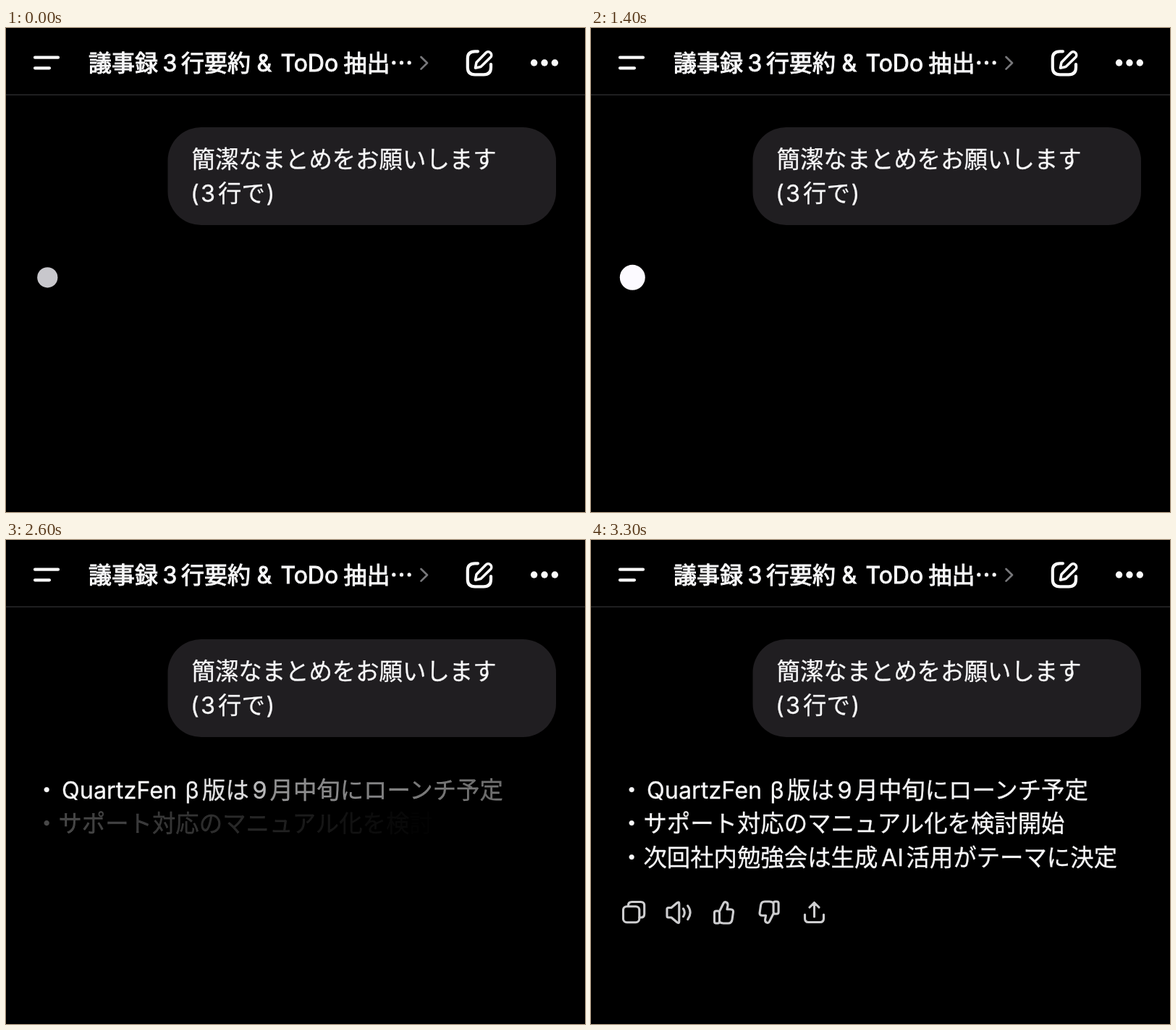
An HTML page that plays this animation: 800 by 668 pixels, repeating every 5.5 s.

```html
<!DOCTYPE html>
<html lang="ja">
<head>
<meta charset="utf-8">
<title>Chat summary</title>
<style>
  html, body { margin: 0; width: 100%; height: 100%; overflow: hidden; background: #000; }
  svg { display: block; width: 100vw; height: 100vh; }
  text { font: 400 32.4px "Noto Sans CJK JP", "Noto Sans CJK", sans-serif; fill: #f8f8f9; stroke: #f8f8f9; stroke-width: .3; white-space: pre; }
  .latin { font-family: Inter, sans-serif; }
  .title { font-size: 32px; stroke-width: 1; }
  .line { fill: none; stroke: #fafafa; stroke-width: 4.2; stroke-linecap: round; stroke-linejoin: round; }
  #actions { stroke: #cdcdcf; stroke-width: 3.1; }
</style>
</head>
<body>
<svg viewBox="0 0 800 668" id="stage">
  <g class="line">
    <path d="M40 40.7H72M40 55.3H60"/>
    <path d="M652 32.3H648Q637.8 32.3 637.8 42V54.5Q637.8 64.3 648 64.3H660Q670 64.3 670 54.5V50"/>
    <path stroke-width="3.6" d="M650 47.5L663 34.2a4.5 4.5 0 0 1 6.4 6.4L656 53.5l-7.5 1.7z"/>
    <path d="M573.5 40l8.5 8.3-8.5 8.3" stroke="#77777a" stroke-width="2.7"/>
  </g>
  <g fill="#fafafa">
    <circle cx="729.6" cy="48" r="4.7"/><circle cx="744" cy="48" r="4.7"/><circle cx="758.3" cy="48" r="4.7"/>
  </g>
  <path d="M0 92.2H800" stroke="#29292b" stroke-width="1.6"/>
  <rect x="223.5" y="137" width="536.5" height="135" rx="46" fill="#201e21"/>
  <g id="words"></g>
  <g id="actions" class="line">
    <g>
      <rect x="44.5" y="505.7" width="22.3" height="22" rx="5"/>
      <path d="M51.5 505.5V504Q51.5 499.5 56.5 499.5H68.7Q73.7 499.5 73.7 504.5V516Q73.7 521 69 521H67"/>
    </g>
    <path d="M105 509.5q0-2 2-2h4l8-6.8q2.8-1.8 2.8 1v25q0 2.8-2.8 1L111 521h-4q-2 0-2-2zM127.5 508.8q3.6 5.4 0 10.8M133.7 504.8q6.8 9.4 0 18.8"/>
    <path id="thumb" d="M170.5 514.5q0-2.5 2.5-2.5h2q2.5 0 2.5 2.5v12q0 2.5-2.5 2.5h-2q-2.5 0-2.5-2.5zM177.5 512.5L183 501.5q1-2.3 3.2-1.8q3.4 1 2.7 5L188 509.7H193q4 0 3.5 4L195 524q-.8 5-5.5 5H183q-3 0-5.5-2"/>
    <use href="#thumb" transform="rotate(180 214.8 514)"/>
    <path d="M295.5 517v5.5q0 5 5 5h16q5 0 5-5V517M308.5 520V501M302 507l6.5-6.5 6.5 6.5"/>
  </g>
  <circle id="pulse" cx="57.3" cy="344.3"/>
</svg>
<script>
const LOOP = 5500, STEP = 100, FADE = 580, SETTLED = 3300, ANSWER = 2000;
const SVG = "http://www.w3.org/2000/svg";
const words = document.getElementById("words");
const pulse = document.getElementById("pulse");
const fades = [];

function write(x, y, string, style = "") {
  const node = document.createElementNS(SVG, "text");
  const latin = /^[\x20-\x7eβ]/.test(string);
  node.setAttribute("x", x);
  node.setAttribute("y", y);
  node.setAttribute("class", style + (latin ? " latin" : ""));
  words.append(node);
  node.textContent = string;
  return { node, latin };
}

// Letters appear one after another between first and last; Latin words appear whole.
function reveal(x, y, string, first, last = first) {
  const { node, latin } = write(x, y, string);
  const parts = latin ? [string] : [...string];
  node.textContent = "";
  parts.forEach((part, i) => {
    const span = document.createElementNS(SVG, "tspan");
    span.textContent = part;
    node.append(span);
    fades.push({ node: span, start: first + (last - first) * i / Math.max(1, parts.length - 1) });
  });
}

write(114, 60, "議事録", "title");
write(216.5, 60, "3", "title");
write(242, 60, "行要約", "title");
write(346.5, 60, "&", "title");
write(379.5, 60, "ToDo", "title");
write(466.5, 60, "抽出…", "title");

write(256.5, 193, "簡潔なまとめをお願いします");
write(255, 240, "(");
write(269, 240, "3");
write(293, 240, "行で");
write(359.5, 240, ")");

reveal(40, 356.5, "・", 2045);
reveal(77, 356.5, "QuartzFen", 2045);
reveal(247.5, 356.5, "β", 2150);
reveal(271, 356.5, "版は", 2200, 2220);
reveal(340.5, 356.5, "9", 2320);
reveal(364.5, 356.5, "月中旬にローンチ予定", 2400, 2458);
reveal(40, 403.3, "・サポート対応のマニュアル化を検討開始", 2508, 2608);
reveal(40, 450, "・次回社内勉強会は生成", 2640, 2720);
reveal(401, 450, "AI", 2728);
reveal(435.5, 450, "活用がテーマに決定", 2735, 2815);
[...document.getElementById("actions").children].forEach((node, i) =>
  fades.push({ node, start: 2788 + 22 * i }));

function draw(time) {
  const t = Math.floor(time % LOOP / STEP) * STEP;
  const swell = 0.5 + 0.5 * Math.cos(2 * Math.PI * (t - 255) / 575);
  const mix = (low, high) => Math.round(low + (high - low) * swell);
  pulse.setAttribute("r", 14 + 3.5 * swell);
  pulse.setAttribute("fill", `rgb(${mix(198, 252)},${mix(197, 250)},${mix(202, 255)})`);
  pulse.setAttribute("visibility", t < ANSWER ? "visible" : "hidden");
  for (const { node, start } of fades) {
    const length = Math.min(FADE, SETTLED - start);
    const u = Math.min(1, Math.max(0, (t - start) / length));
    const alpha = 1 - (1 - u) ** 2;
    if (node.tagName === "tspan") {
      node.setAttribute("fill-opacity", alpha);
      node.setAttribute("stroke-opacity", alpha);
    } else {
      node.setAttribute("opacity", alpha);
    }
  }
}

const begin = performance.now();
function tick() {
  draw(performance.now() - begin);
  requestAnimationFrame(tick);
}
tick();
</script>
</body>
</html>
```
